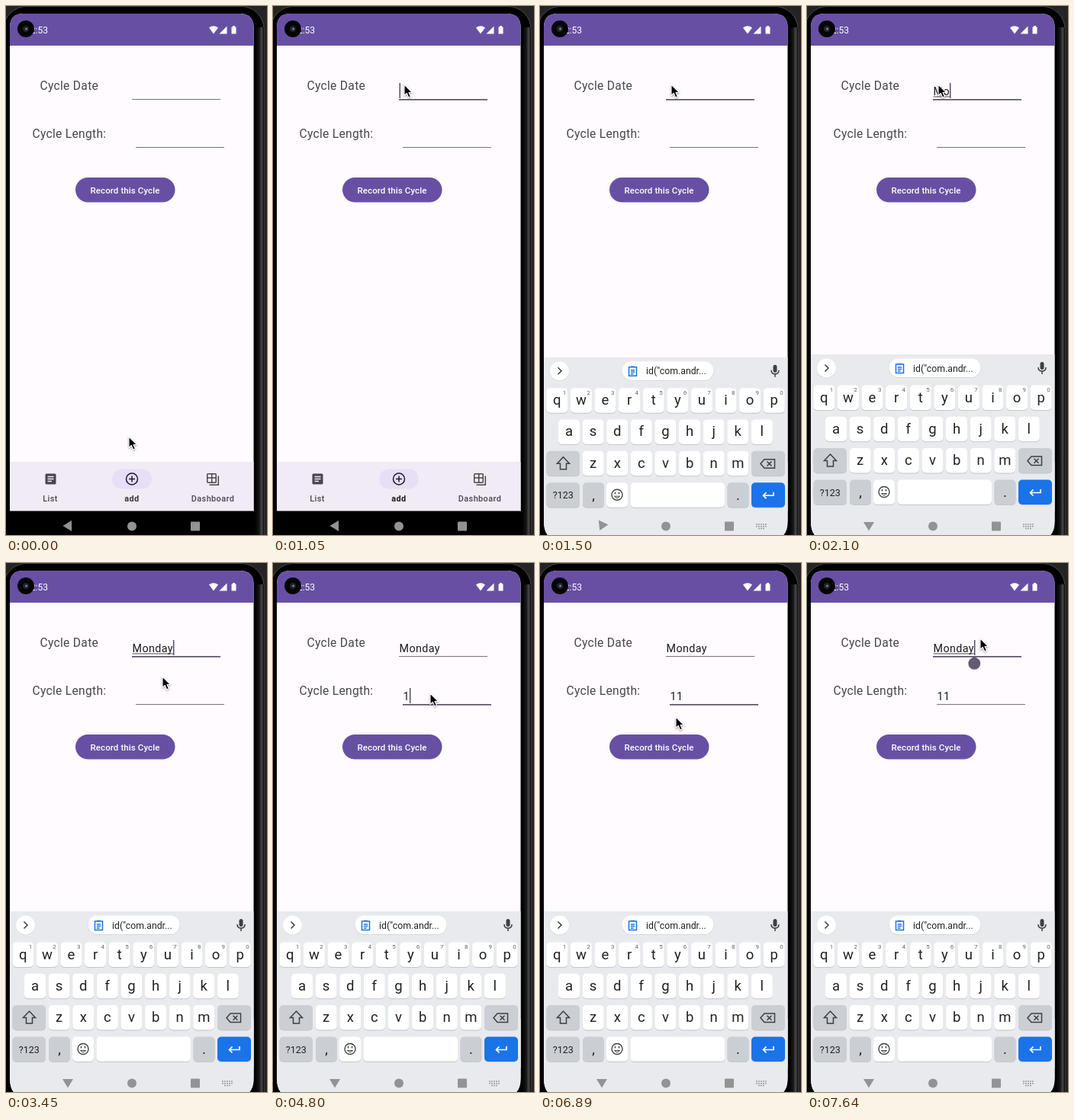
Recreate the animation shown at these times as an HTML page. Size 342 px wide and 694 px high, loop 8000 ms.

```html
<!DOCTYPE html>
<html lang="en">
<head>
<meta charset="utf-8">
<title>Cycle form</title>
<style>
html, body { margin: 0; width: 100%; height: 100%; overflow: hidden; background: #1c1c1c; }
svg { display: block; width: 342px; height: 694px; font-family: Roboto, "Open Sans", sans-serif; }
.label { font-size: 15.6px; letter-spacing: .3px; fill: #49454f; }
.value { font-size: 14.3px; letter-spacing: .4px; fill: #1c1b1f; }
.tab { font-size: 10.9px; letter-spacing: .4px; font-weight: 500; fill: #49454f; text-anchor: middle; }
.key { font-size: 18.5px; fill: #202124; text-anchor: middle; }
.hint { font-size: 8px; fill: #5f6368; text-anchor: middle; }
.line { fill: none; stroke: #49454f; stroke-width: 1.5; }
</style>
</head>
<body>
<svg viewBox="0 0 342 694">
  <defs>
    <clipPath id="screen"><path d="M5 28Q5 10 23 10H306Q324.500 10 324.500 28V676Q324.500 688 319 694H10Q5 688 5 676Z"/></clipPath>
    <linearGradient id="edge">
      <stop offset="0" stop-color="#000"/><stop offset=".5" stop-color="#161616"/>
      <stop offset=".75" stop-color="#4a4a4a"/><stop offset="1" stop-color="#0a0a0a"/>
    </linearGradient>
  </defs>

  <rect width="342" height="694" fill="#242424"/>
  <rect x="-3" y=".5" width="341" height="740" rx="30" fill="#000" stroke="#4a4a4a"/>
  <rect x="326" y="28" width="12" height="666" fill="url(#edge)"/>

  <g clip-path="url(#screen)">
    <rect y="10" width="342" height="653" fill="#fffbfe"/>
    <rect y="10" width="342" height="42" fill="#6750a4"/>
    <text x="55" y="36" text-anchor="end" font-size="12" fill="#fff">12:53</text>
    <g fill="#fff">
      <path d="M266 28.500Q272 24 278 28.500L272 36.500Z"/>
      <path d="M289.500 26.500V36.500H279.500Z"/>
      <path d="M295.500 27.500H297V26H300V27.500H301.500V36.500H295.500Z"/>
    </g>

    <text class="label" x="44.500" y="110">Cycle Date</text>
    <text class="label" x="34.500" y="173">Cycle Length:</text>
    <g id="fields"></g>
    <rect x="91" y="225" width="130.500" height="32.500" rx="16.250" fill="#6750a4"/>
    <rect id="press" x="91" y="225" width="130.500" height="32.500" rx="16.250" fill="#fff"/>
    <text x="156" y="245.500" text-anchor="middle" font-size="11.500" letter-spacing=".1" font-weight="500" fill="#fff">Record this Cycle</text>

    <rect y="598" width="342" height="65" fill="#f1ebf6"/>
    <rect x="139" y="607.500" width="52" height="26" rx="13" fill="#e8def8"/>
    <rect x="51.500" y="613.500" width="14" height="14" rx="1.500" fill="#49454f"/>
    <path d="M54.500 617.500H62.500M54.500 620.500H62.500M54.500 623.500H60" stroke="#f1ebf6" stroke-width="1.400"/>
    <g class="line" style="stroke:#1d192b">
      <circle cx="165" cy="620.500" r="7.500"/><path d="M161 620.500H169M165 616.500V624.500"/>
    </g>
    <g class="line">
      <rect x="263.700" y="613.700" width="11.500" height="11.500" rx="1"/>
      <path d="M263.700 619H275M269.700 619V625M269.700 614V619M278.300 616.500V628.300H266.500"/>
    </g>
    <text class="tab" x="58" y="650">List</text>
    <text class="tab" id="add" x="165" y="650" style="font-weight:700;fill:#1d1b20">add</text>
    <text class="tab" x="271" y="650">Dashboard</text>

    <rect id="sysbar" y="662.500" width="342" height="32"/>
    <g id="board"></g>
    <rect id="foot" y="662.500" width="342" height="32" fill="#e8eaed"/>
    <g fill="#939393">
      <path id="back" d="M-7 -5H7L0 6.500Z"/>
      <circle cx="165" cy="682.500" r="6"/>
      <rect x="242" y="676.500" width="12" height="12" rx="1"/>
    </g>
    <path id="dots" d="M283 680H297M283 682.700H297M286 685.500H294" stroke="#939393" stroke-width="1.500" stroke-dasharray="1.800 1.200"/>
  </g>

  <circle cx="26" cy="30" r="11" fill="#050505"/>
  <circle cx="26" cy="30" r="4" fill="#20242a"/>
  <circle cx="26.500" cy="30" r="1.500" fill="#7a8088"/>

  <path id="mouse" d="M0 0V14.500L3.300 11.400L5.700 17L8.400 15.800L6 10.500H10.500Z" fill="#000" stroke="#fff" stroke-width="1.100" stroke-linejoin="round" style="filter:drop-shadow(0 1px 1px #0006)"/>
</svg>

<script>
const $ = id => document.getElementById(id);
const LOOP = 8000;

function add(parent, tag, attrs, text) {
  const el = document.createElementNS('http://www.w3.org/2000/svg', tag);
  for (const k in attrs) el.setAttribute(k, attrs[k]);
  if (text) el.textContent = text;
  return parent.appendChild(el);
}

// Text fields
function makeField(x, y) {
  const g = $('fields');
  return {
    x, y,
    rule: add(g, 'rect', { x: x - .5, width: 116 }),
    mark: add(g, 'rect', { x, y: y - 4, height: 1, fill: '#49454f' }),
    text: add(g, 'text', { class: 'value', x, y: y - 5.5 }),
    caret: add(g, 'rect', { y: y - 21.500, width: 1.500, height: 20, fill: '#544d68' })
  };
}

function drawField(f, value, focused, caret, composing) {
  f.text.textContent = value;
  const w = value ? f.text.getComputedTextLength() : 0;
  f.rule.setAttribute('y', focused ? f.y - .5 : f.y - .5);
  f.rule.setAttribute('height', focused ? 1.700 : 1);
  f.rule.setAttribute('fill', focused ? '#5a5368' : '#77737b');
  f.mark.setAttribute('width', composing ? w : 0);
  f.caret.setAttribute('x', f.x + w);
  f.caret.style.opacity = focused && caret ? 1 : 0;
}

const date = makeField(165.500, 122.500);
const len = makeField(170.500, 185.500);
const handle = add($('fields'), 'path', {
  d: 'M219.300 122.500L225 126.200A8 8 0 1 1 213.600 126.200Z', fill: '#625b71'
});

// Keyboard
const board = $('board'), letters = [];
let shift;

function key(x, y, w, fill = '#fff') {
  add(board, 'rect', { x, y: y + 1, width: w, height: 32.500, rx: 5, fill: '#c3c6ca' });
  add(board, 'rect', { x, y, width: w, height: 32.500, rx: 5, fill });
}

function row(chars, x0, y, hints) {
  [...chars].forEach((c, i) => {
    const x = x0 + i * 31.600;
    key(x - 14, y, 28);
    letters.push(add(board, 'text', { class: 'key', x, y: y + 22 }, c));
    if (hints) add(board, 'text', { class: 'hint', x: x + 9.700, y: y + 8.500 }, String((i + 1) % 10));
  });
}

function icon(d, color = '#3c4043', extra = {}) {
  return add(board, 'path', { d, fill: 'none', stroke: color, 'stroke-width': 1.500, ...extra });
}

function buildBoard() {
  const grey = '#cbced3';
  add(board, 'rect', { y: 457, width: 342, height: 240, fill: '#e8eaed' });
  add(board, 'circle', { cx: 25.500, cy: 475.500, r: 12.700, fill: '#d5d7da' });
  add(board, 'circle', { cx: 25.500, cy: 475, r: 12.500, fill: '#fff' });
  icon('M23.500 470.500L28 475L23.500 479.500');
  add(board, 'rect', { x: 107, y: 463, width: 121, height: 25, rx: 12.500, fill: '#d5d7da' });
  add(board, 'rect', { x: 107.500, y: 462.500, width: 120, height: 24.500, rx: 12.200, fill: '#fff' });
  icon('M116.500 470H126.500V481.500H116.500ZM119 469.500H124M118.800 474H124.200M118.800 476.500H124.200M118.800 479H122.500', '#1a73e8');
  add(board, 'text', { x: 139, y: 479.500, 'font-size': 12.300, fill: '#202124' }, 'id("com.andr...');
  add(board, 'rect', { x: 305.500, y: 467, width: 5, height: 10, rx: 2.500, fill: '#3c4043' });
  icon('M303 474Q303 479 308 479T313 474M308 479V483');

  row('qwertyuiop', 22.300, 497.500, true);
  row('asdfghjkl', 38, 538.700);
  row('zxcvbnm', 69.700, 580);
  key(8.500, 580, 43.500, grey);
  shift = icon('M30.500 588L38.500 596.500H34.500V604H26.500V596.500H22.500Z');
  key(277, 580, 44, grey);
  icon('M294 591H307.500V602.500H294L289 596.700ZM297.500 593.800L303.500 599.800M303.500 593.800L297.500 599.800');

  key(8.500, 621.500, 43.500, grey);
  add(board, 'text', { class: 'key', x: 30.300, y: 642.500, style: 'font-size:12.500px' }, '?123');
  key(56, 621.500, 28, grey);
  add(board, 'text', { class: 'key', x: 70, y: 644 }, ',');
  key(87, 621.500, 28);
  add(board, 'circle', { cx: 101, cy: 637.500, r: 7, fill: 'none', stroke: '#3c4043', 'stroke-width': 1.400 });
  icon('M97.500 639.500Q101 644 104.500 639.500Z', '#3c4043', { 'stroke-width': 1 });
  icon('M98.500 634V636.500M103.500 634V636.500');
  key(118.500, 621.500, 123.500);
  key(245.500, 621.500, 28, grey);
  add(board, 'text', { class: 'key', x: 259.500, y: 644 }, '.');
  key(277, 621.500, 44, '#1a73e8');
  icon('M306 634V638.500H292.500M296.500 634.500L292.500 638.500L296.500 642.500', '#fff', { 'stroke-width': 1.700 });
}
buildBoard();

// Each step changes part of the state: m pointer, d / n field values,
// f focused field, c caret, kb keyboard offset, turn back-arrow angle.
const steps = [
  [0, { m: [161, 565], d: '', n: '', f: 0, c: 1, kb: null, turn: 90, add: .88 }],
  [150, { m: [163, 535], add: .94 }],
  [300, { m: [173, 430], add: 1 }],
  [450, { m: [184, 270] }],
  [600, { m: [188, 130] }],
  [750, { m: [182, 66] }],
  [900, { m: [173, 97] }],
  [1050, { m: [172, 103], f: 1 }],
  [1350, { kb: 110, turn: 75 }],
  [1500, { kb: 3.700, turn: 25, c: 0 }],
  [1650, { kb: 0, turn: 0 }],
  [1950, { d: 'M', c: 1, caps: 1, comp: 1 }],
  [2100, { d: 'Mo', caps: 0 }],
  [2700, { d: 'Mon' }],
  [2850, { d: 'Monda' }],
  [3000, { d: 'Monday' }],
  [3300, { m: [188, 122] }],
  [3450, { m: [205, 149] }],
  [3600, { m: [207, 166], c: 0 }],
  [3750, { m: [206, 171] }],
  [4050, { f: 2, c: 1, comp: 0 }],
  [4500, { c: 0 }],
  [4800, { n: '1', c: 1 }],
  [5100, { n: '11' }],
  [5400, { m: [199, 188] }],
  [5550, { m: [177, 225] }],
  [5700, { m: [160, 250], c: 0 }],
  [5850, { m: [159, 243] }],
  [6150, { c: 1, press: .04 }],
  [6300, { press: 0 }],
  [6600, { m: [162, 236], c: 0 }],
  [6750, { m: [178, 202] }],
  [6900, { m: [203, 150] }],
  [7050, { m: [222, 106], c: 1 }],
  [7200, { m: [227, 88] }],
  [7350, { m: [227, 97] }],
  [7500, { m: [227, 99], f: 1, comp: 1, grip: 1 }]
];

function draw(s) {
  const up = s.kb !== null;
  $('mouse').setAttribute('transform', `translate(${s.m})`);
  drawField(date, s.d, s.f === 1, s.c, s.comp);
  drawField(len, s.n, s.f === 2, s.c, 0);
  handle.style.opacity = s.grip ? 1 : 0;
  $('press').style.opacity = s.press || 0;
  $('add').style.opacity = s.add;
  $('back').setAttribute('transform', `translate(81 682) rotate(${s.turn})`);
  for (const id of ['board', 'foot', 'dots']) $(id).style.display = up ? '' : 'none';
  board.setAttribute('transform', `translate(0 ${s.kb || 0})`);
  for (const el of letters) {
    el.textContent = s.caps ? el.textContent.toUpperCase() : el.textContent.toLowerCase();
  }
  shift.setAttribute('fill', s.caps ? '#3c4043' : 'none');
}

const start = performance.now();
let shown = 0;
function tick(now) {
  const t = Math.max(0, now - start) % LOOP;
  const past = steps.filter(([at]) => at <= t);
  if (past.length !== shown) {
    shown = past.length;
    draw(Object.assign({}, ...past.map(p => p[1])));
  }
  requestAnimationFrame(tick);
}
tick(start);
</script>
</body>
</html>
```
